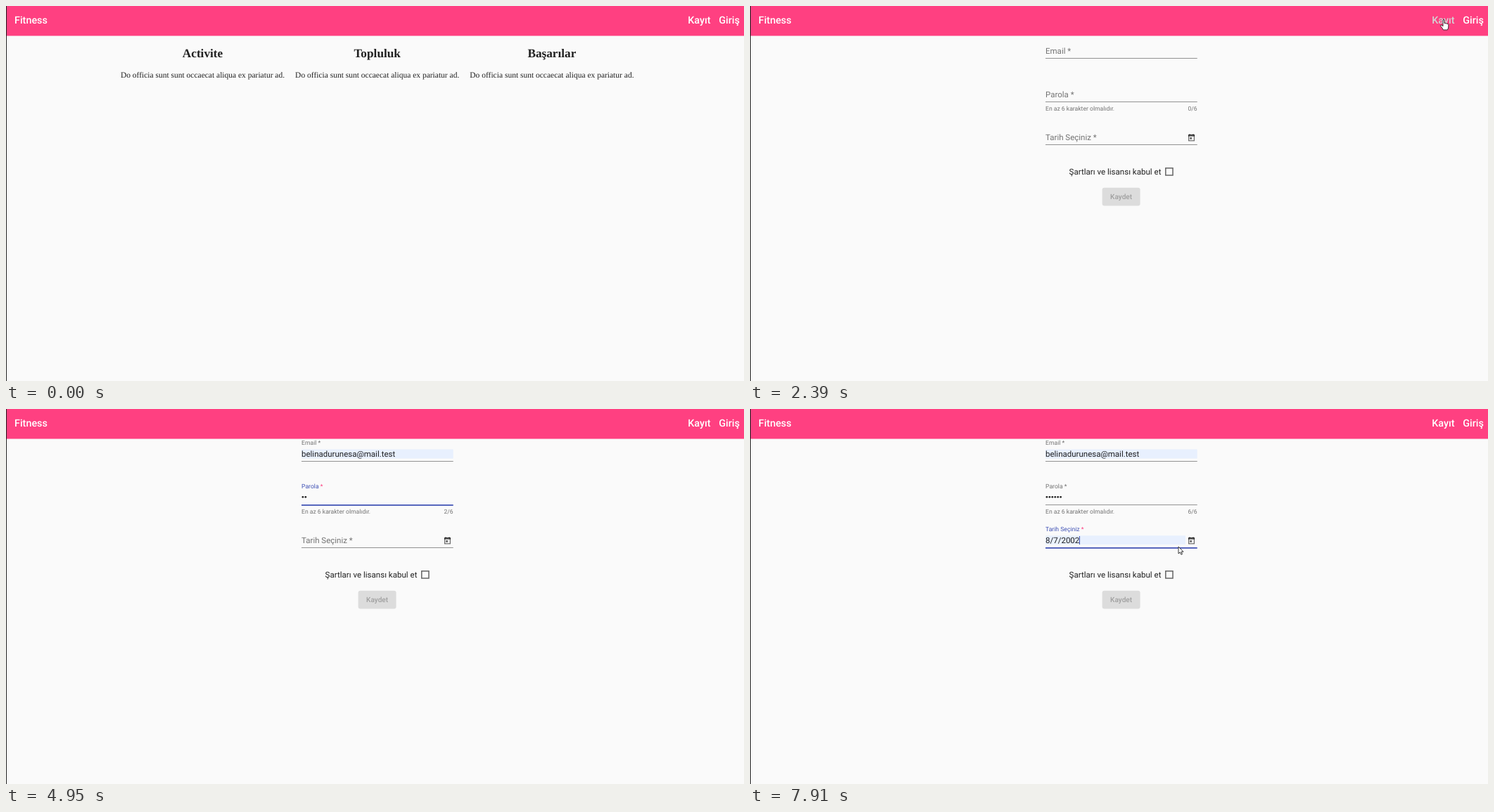
An HTML page with a canvas that plays this animation: 1049 px wide and 534 px high, repeating every 7.99 s.

```html
<!DOCTYPE html>
<html lang="tr">
<head>
<meta charset="utf-8">
<title>Fitness</title>
<style>
html, body { margin: 0; width: 100%; height: 100%; overflow: hidden; background: #fafafa; }
canvas { display: block; width: 100vw; height: 100vh; }
</style>
</head>
<body>
<canvas id="stage" width="1049" height="534"></canvas>
<script>
const ctx = document.getElementById('stage').getContext('2d');
const LOOP = 7990, STEP = 75;
const PINK = '#ff4081', BLUE = '#3f51b5', FILL = '#e8f0fe';
const ink = a => `rgba(0,0,0,${a})`;
const MAIL = 'belinadurunesa@mail.test', DATE = '8/7/2002';
const LEFT = 420, RIGHT = 635.7, MID = 527.6;
const SERIF = '"Liberation Serif", serif', SANS = 'Roboto, sans-serif';
const MENU = '"Open Sans", sans-serif';

// Pointer path: time, x, y, shape held until the next key
const path = [
  [70, 886, 482, 'arrow'], [220, 940, 300, 'arrow'], [360, 1005, 90, 'arrow'],
  [440, 1021, 8, 'arrow'], [510, 1020, 20, 'hand'], [585, 1020, 20, 'hand'],
  [660, 1019.5, 18, 'hand'], [1060, 1019.5, 18, 'hand'], [1300, 1012, 16, 'arrow'],
  [1530, 1005, 11, 'arrow'], [1605, 1005, 11, 'arrow'], [1680, 1005, 6, 'arrow'],
  [1840, 1005, 3.5, 'arrow'], [1920, 1000, 7, 'arrow'], [2080, 986, 19, 'hand'],
  [2320, 986, 19, 'hand'], [2470, 549, 32, 'arrow'], [2700, 480, 55, 'arrow'],
  [2850, 461.5, 67, 'beam'], [3395, 461.5, 67, 'beam'], [3470, 461, 80, 'arrow'],
  [3550, 461, 88, 'arrow'], [3705, 461, 88, 'arrow'], [3780, 461, 103, 'arrow'],
  [3860, 461, 106.5, 'arrow'], [4010, 461, 106.5, 'arrow'], [4160, 461, 125, 'beam'],
  [4790, 461, 125, ''], [6120, 527, 108, 'arrow'], [6205, 527, 108, 'arrow'],
  [6280, 500, 128, 'arrow'], [6430, 430.5, 190, 'beam'], [6510, 432, 194, 'arrow'],
  [6585, 432, 194, 'arrow'], [6660, 431, 190, 'beam'], [6900, 431, 190, 'beam'],
  [7130, 439, 206, 'arrow'], [7300, 441, 209, 'arrow'], [7685, 441, 209, 'arrow'],
  [7760, 505, 182, 'arrow'], [7835, 575, 177, 'arrow'], [7910, 609, 196, 'arrow'],
  [LOOP, 609, 196, 'arrow']
];
const clicks = [[910, 1060], [2080, 2230], [3000, 3070], [3550, 3625],
  [3780, 3935], [4160, 4310], [6660, 6810], [7450, 7530]];
const typed = [4790, 4950, 5170, 5400, 5570, 5720];

const between = (t, a, b) => t >= a && t < b;
const clamp = v => Math.max(0, Math.min(1, v));
const easeOut = u => 1 - (1 - clamp(u)) ** 3;

function rect(x, y, w, h, color, r = 0) {
  ctx.fillStyle = color;
  ctx.beginPath();
  ctx.roundRect(x, y, w, h, r);
  ctx.fill();
}

function text(str, x, y, size, color, { align = 'left', weight = 400, font = SANS } = {}) {
  ctx.font = `${weight} ${size}px ${font}`;
  ctx.textAlign = align;
  ctx.fillStyle = color;
  ctx.fillText(str, x, y);
  return ctx.measureText(str).width;
}

function header(t) {
  rect(0, 0, 1049, 42.4, PINK);
  const bar = { weight: 500 };
  text('Fitness', 12, 25, 14.4, '#fff', bar);
  text('Kayıt', 969.2, 25, 14.4, between(t, 2080, 2400) ? '#d3d3d3' : '#fff', bar);
  text('Giriş', 1013.2, 25, 14.4, between(t, 510, 1220) ? '#d3d3d3' : '#fff', bar);
}

function home() {
  ['Activite', 'Topluluk', 'Başarılar'].forEach((title, i) => {
    const x = 279.5 + i * 248.2;
    text(title, x, 73, 17.25, ink(.87), { align: 'center', weight: 700, font: SERIF });
    text('Do officia sunt sunt occaecat aliqua ex pariatur ad.', x, 102, 11.5, ink(.87),
      { align: 'center', font: SERIF });
  });
}

// Outlined form field; lift is 0 for a resting label and 1 for a floating one
function field(label, x, right, base, lift = 0, focused = false) {
  const size = 11.5 - 2.875 * lift, y = base - 17 * lift;
  const w = text(label + ' ', x, y, size, focused ? BLUE : ink(.54));
  text('*', x + w, y, size, focused ? PINK : ink(.54));
  const line = Math.floor(base + 6.9);
  if (focused) rect(x, line, right - x, 1.8, BLUE);
  else rect(x, line, right - x, 1, ink(.42));
}

function hint(x, right, count) {
  text('En az 6 karakter olmalıdır.', x, 149, 8.6, ink(.54));
  text(count + '/6', right, 149, 8.6, ink(.54), { align: 'right' });
}

function button(label, y, w, weight) {
  rect(MID - w / 2, y, w, 25.8, ink(.12), 3);
  text(label, MID, y + 16.6, 10.07, ink(.28), { align: 'center', weight });
}

function login() {
  field('Email', 463, 592.6, 68);
  field('Parola', 463, 592.6, 129.5);
  hint(463, 592.6, 0);
  button('Oturum Aç', 165.8, 71.6, 400);
}

function calendar(x, y) {
  const c = ink(.58);
  ctx.strokeStyle = c;
  ctx.lineWidth = 1.2;
  ctx.strokeRect(x + .6, y + 1.6, 7.8, 8.2);
  rect(x, y + 1, 9, 2.8, c);
  rect(x + 1.5, y, 1.2, 1.2, c);
  rect(x + 6.3, y, 1.2, 1.2, c);
  rect(x + 2.2, y + 5, 2.8, 2.8, c);
}

function menu(y, w, rows, hover) {
  ctx.save();
  ctx.shadowColor = ink(.35);
  ctx.shadowBlur = 3;
  ctx.shadowOffsetY = 1;
  rect(419.3, y, w, 13 + rows.length * 26, '#fff', 3);
  ctx.restore();
  if (hover) rect(419.3, y + 6.5, w, 26, '#ececec');
  rows.forEach((row, i) =>
    text(row, 428, y + 22.5 + i * 26, 8.9, '#202124', { weight: 600, font: MENU }));
}

function signup(t) {
  const mailFocus = between(t, 3000, 3780);
  const passFocus = between(t, 4160, 6660);
  const dateFocus = t >= 6660;
  const lift = (start, lead) => t < start ? 0 : easeOut((t - start + lead) / 270);
  const count = typed.filter(k => t >= k).length;

  if (t >= 3470) {
    rect(LEFT, 57.6, RIGHT - LEFT, 12.8, FILL);
    text(MAIL, LEFT, 68, 11.5, ink(.87));
  }
  field('Email', LEFT, RIGHT, 68, lift(3000, 40), mailFocus);
  if (between(t, 3000, 3470)) rect(419.8, 58, 1, 12, BLUE);

  field('Parola', LEFT, RIGHT, 129.5, lift(4160, 40), passFocus);
  ctx.fillStyle = ink(.87);
  for (let i = 0; i < count; i++) {
    ctx.beginPath();
    ctx.arc(421.9 + 3.95 * i, 125.3, 1.35, 0, 7);
    ctx.fill();
  }
  hint(LEFT, RIGHT, count);

  if (t >= 7130) {
    rect(LEFT, 180.3, 199, 12.8, FILL);
    const w = text(DATE, LEFT, 190.8, 11.5, ink(.87));
    if (t >= 7530) rect(LEFT + w - .3, 181, 1, 12, BLUE);
  }
  field('Tarih Seçiniz', LEFT, RIGHT, 190.8, lift(6660, 40), dateFocus);
  calendar(623, 182);

  text('Şartları ve lisansı kabul et', 453.6, 239.8, 11.55, ink(.87));
  ctx.strokeStyle = ink(.6);
  ctx.lineWidth = 1.5;
  ctx.strokeRect(590.8, 230.8, 10.2, 10.2);
  button('Kaydet', 258.8, 54, 500);

  if (between(t, 3000, 3630)) menu(69.5, 217, [MAIL, 'sddsd', 'ddfdf'], t >= 3470);
  if (between(t, 6740, 7530)) menu(192.3, 199.5, [DATE, '7/8/2002'], t >= 7130);
}

function statusBar(t) {
  if (!between(t, 660, 2000)) return;
  ctx.globalAlpha = t < 1680 ? 1 : clamp(1 - (t - 1600) / 360);
  rect(0, 529.5, 87, 6, '#dee1e6', [0, 3, 0, 0]);
  ctx.globalAlpha = 1;
}

function pointerAt(t) {
  const i = path.findLastIndex(k => t >= k[0]);
  if (i < 0) return null;
  const [t0, x0, y0, shape] = path[i], [t1, x1, y1] = path[i + 1] || path[i];
  const u = t1 > t0 ? Math.floor((t - t0) / STEP) * STEP / (t1 - t0) : 0;
  return { x: x0 + (x1 - x0) * u, y: y0 + (y1 - y0) * u, shape };
}

const shapes = {
  arrow: 'M0 0V10L2.3 7.9L3.9 11.3L5.5 10.6L4 7.3H7Z',
  hand: 'M-1 1Q0 -.6 1 1V5.6Q2 4.6 3 5.9Q4 5.2 4.8 6.4Q6.6 5.8 6.8 7.6V11' +
        'Q6.6 13 5.4 15H-.6Q-1.6 12.6-4.4 9.6Q-4.7 7.4-2.6 8.4L-1 9.8Z'
};

function pointer(t) {
  const p = pointerAt(t);
  if (!p || !p.shape) return;
  ctx.save();
  ctx.translate(p.x, p.y);
  if (clicks.some(([a, b]) => between(t, a, b))) {
    ctx.fillStyle = 'rgba(255,240,0,.6)';
    ctx.beginPath();
    ctx.arc(-.3, p.shape === 'hand' ? 2 : 0, 8.8, 0, 7);
    ctx.fill();
  }
  if (p.shape === 'beam') {
    const c = '#222';
    rect(-.5, -4.5, 1, 9, c);
    rect(-2.3, -5, 4.6, .9, c);
    rect(-2.3, 4.1, 4.6, .9, c);
  } else {
    const shape = new Path2D(shapes[p.shape]);
    ctx.fillStyle = '#fff';
    ctx.strokeStyle = '#222';
    ctx.lineWidth = .9;
    ctx.lineJoin = 'round';
    ctx.fill(shape);
    ctx.stroke(shape);
  }
  ctx.restore();
}

function draw(t) {
  rect(0, 0, 1049, 534, '#fafafa');
  header(t);
  if (t < 1060) home();
  else if (t < 2320) login();
  else signup(t);
  statusBar(t);
  rect(0, 0, 1, 534, '#222');
  pointer(t);
}

ctx.textRendering = 'geometricPrecision';
const start = performance.now();
function tick() {
  draw((performance.now() - start) % LOOP);
  requestAnimationFrame(tick);
}
tick();
</script>
</body>
</html>
```
